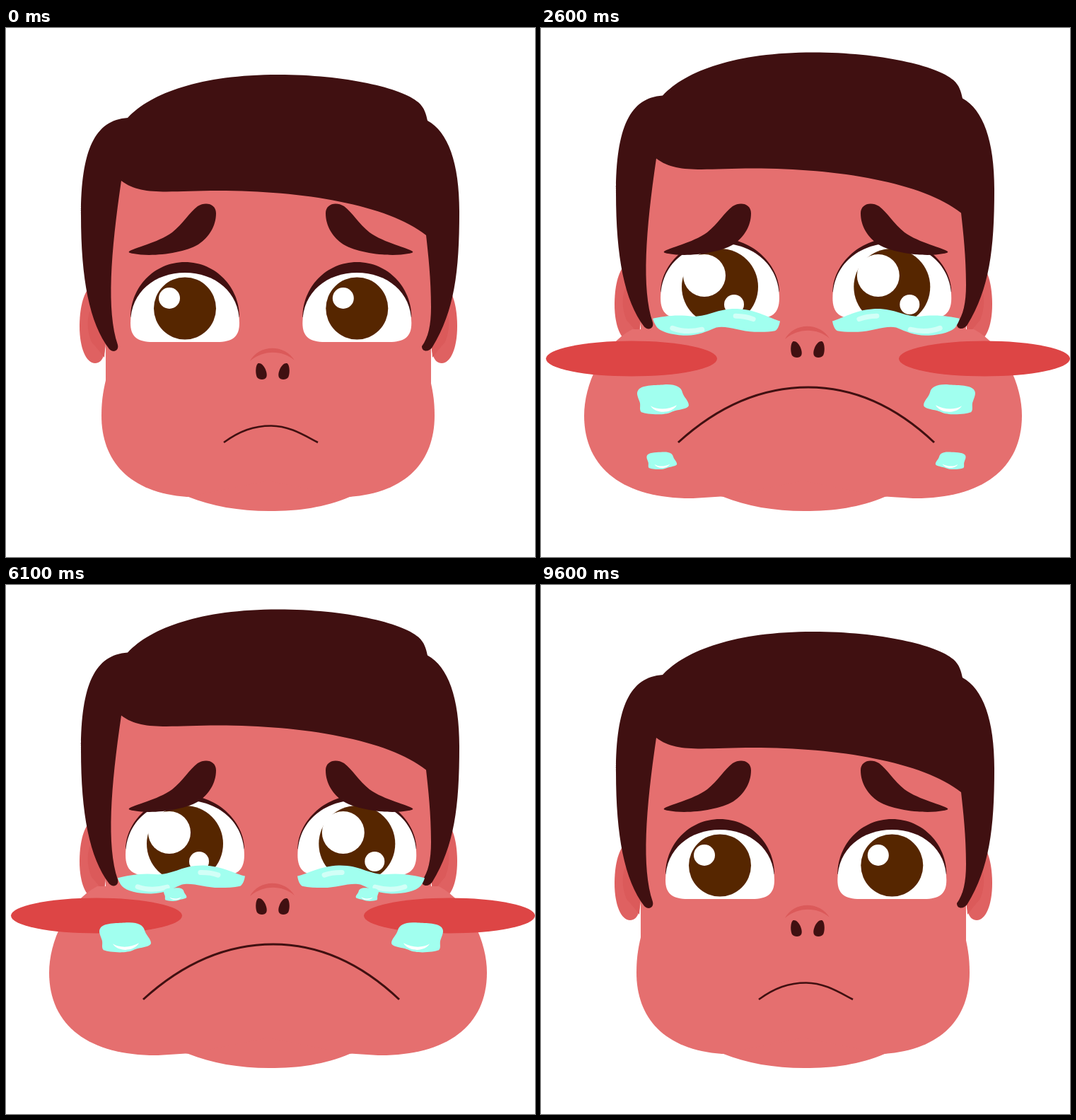
Recreate the animation shown at these times as an HTML page with a canvas. Size 748 by 748 pixels, loop 9630 ms.

```html
<!DOCTYPE html>
<html lang="en">
<head>
<meta charset="utf-8">
<title>Sad face</title>
<style>
html, body { margin: 0; width: 100%; height: 100%; overflow: hidden; background: #fff; }
canvas { display: block; width: 748px; height: 748px; }
</style>
</head>
<body>
<canvas id="stage" width="748" height="748"></canvas>
<script>
const ctx = document.getElementById('stage').getContext('2d');
const LOOP = 9630, CYCLE = 4750, START = 50, HOLD = 3200;
const SKIN = '#e56f6f', SHADE = '#db5a5a', DARK = '#401011', BLUSH = '#dd4545',
      IRIS = '#562600', TEAR = '#a1ffef', SHINE = '#d2fff7';

// rise duration, fall delay, fall duration (ms)
const PARTS = {
  hair: [916, 60, 802],
  ear: [1146, 0, 900],
  nose: [916, 215, 500],
  eye: [970, -30, 930],
  mouth: [1017, 0, 805],
  jaw: [1146, 0, 805],
  blush: [940, -14, 650]
};

// time, x, y, size of each falling drop
const DROPS = [
  [[800, 150, 420, 0], [1120, 157, 466, 1], [1450, 177, 525, 1], [1900, 171, 594, .8], [2200, 152, 629, .33], [2350, 141, 640, 0]],
  [[1150, 240, 422, 0], [1450, 238, 453, .88], [2200, 210, 560, .84], [2600, 165, 619, .55], [2950, 114, 648, 0]],
  [[1850, 165, 422, 0], [2200, 155, 466, 1], [2550, 172, 525, 1], [3000, 146, 598, .7], [3470, 119, 629, .17], [3580, 112, 634, 0]]
];

const shape = {
  head: new Path2D('M141 180H601V500C601 600 560 645 486 663C450 678 415 683 372 683C330 683 290 676 258 663C175 645 141 600 141 500Z'),
  hair: new Path2D('M172 127C205 92 275 66 385 66C480 66 560 85 583 105C592 113 594 122 596 131C625 147 641 190 641 260C641 345 634 400 603 451C599 458 588 459 588 450C597 438 601 420 601 395C601 355 597 320 594 293C540 250 420 230 300 230C230 230 192 238 163 216C148 318 142 400 158 448C160 456 152 460 146 454C118 417 106 355 106 265C106 172 126 130 172 127Z'),
  ear: new Path2D('M120 365C108 375 104 400 104 422C104 452 113 474 126 474C137 474 141 460 141 440V365Z'),
  earFold: new Path2D('M124 395C114 400 113 425 121 444C128 452 133 458 139 466L141 440V400Z'),
  bump: new Path2D('M345 471C358 447 394 447 408 470C390 455 364 455 345 471Z'),
  nostril: new Path2D('M357 474C364 473 371 488 368 494C366 498 358 498 355 494C352 488 353 475 357 474Z'),
  brow: new Path2D('M174 316C180 311 214 304 235 289C250 277 259 261 271 252C283 245 297 249 297 262C297 280 287 296 272 306C250 319 205 324 180 319C174 318 173 317 174 316Z'),
  white: new Path2D('M-77 22C-77 -22 -42 -49 0 -49C42 -49 77 -22 77 22C77 42 67 49 45 49H-45C-67 49 -77 42 -77 22Z'),
  pool: new Path2D('M158 -2C172 -5 190 -9 215 -6C240 -7 250 -19 280 -18C305 -17 325 -5 338 -2C337 4 335 10 331 12C322 14 312 14 302 14C282 14 262 5 248 9C232 16 222 21 205 21C188 21 170 17 164 10C161 6 159 2 158 -2Z'),
  drop: new Path2D('M-34 -14C-28 -21 -8 -20 2 -21C18 -22 26 -18 28 -10C30 -3 37 2 37 8C37 14 20 14 12 18C2 23 -22 21 -30 18C-34 14 -30 8 -33 2C-35 -4 -38 -9 -34 -14Z'),
  dropShine: new Path2D('M-17 9C-8 15 8 15 20 8C14 20 -10 21 -17 9Z'),
  poolShine: new Path2D('M186 11Q205 18 228 12M275 -8Q290 -8 300 -4')
};

const clamp = v => Math.min(1, Math.max(0, v));
const ease = u => (1 - Math.cos(Math.PI * clamp(u))) / 2;
const bell = u => Math.sin(Math.PI * clamp(u));
const mix = (a, b, k) => a + (b - a) * k;

function fill(path, color) {
  ctx.fillStyle = color;
  ctx.fill(path);
}

function oval(x, y, rx, ry, color) {
  ctx.fillStyle = color;
  ctx.beginPath();
  ctx.ellipse(x, y, Math.max(0, rx), Math.max(0, ry), 0, 0, 7);
  ctx.fill();
}

function at(x, y, draw) {
  ctx.save();
  ctx.translate(x, y);
  draw();
  ctx.restore();
}

// draws once as is and once mirrored around x = axis
function both(axis, draw) {
  draw(0);
  ctx.save();
  ctx.translate(2 * axis, 0);
  ctx.scale(-1, 1);
  draw(1);
  ctx.restore();
}

function cheeks(k) {
  const x = mix(143, 129, clamp(2 * k)), y = mix(490, 426, Math.max(0, k) ** .7), e = mix(135, 61, k);
  both(370.5, () => {
    ctx.fillStyle = SKIN;
    ctx.beginPath();
    ctx.moveTo(x, y);
    ctx.bezierCurveTo(mix(138, 85, k), mix(510, 450, k), e, mix(525, 505, k), e, 548);
    ctx.bezierCurveTo(e, mix(612, 625, k), mix(174, 120, k), mix(657, 666, k), mix(256, 215, k), mix(663, 665, k));
    ctx.lineTo(262, 662);
    ctx.lineTo(372, 640);
    ctx.lineTo(372, y);
    ctx.fill();
  });
}

function eye(x, p, right) {
  const k = p.eye, m = p.mouth, s = mix(1, 1.09, k);
  ctx.save();
  ctx.translate(x, mix(395, 358, k));
  ctx.scale(s, s);
  const top = -49 - mix(15, 6.5, k);
  ctx.fillStyle = DARK;
  ctx.beginPath();
  ctx.moveTo(-77, 14);
  ctx.bezierCurveTo(-77, top + 36, -44, top, 0, top);
  ctx.bezierCurveTo(44, top, 77, top + 36, 77, 14);
  ctx.fill();
  fill(shape.white, '#fff');
  ctx.clip(shape.white);
  const r = mix(44, 54, m) / s;
  oval(0, (mix(396.5, 366, m) - mix(395, 358, k)) / s, r, r, IRIS);
  ctx.restore();
  const shift = right ? 2.5 : 0, big = mix(15, 30, p.jaw);
  oval(x - 22 + shift, mix(382, 350, m), big, big, '#fff');
  oval(x + 20 + 2 * shift, 423 - 32 * m, 14 * m, 14 * m, '#fff');
}

function mouth(k) {
  const lean = bell(k);
  const px = mix(375, 378, k) + 9 * lean, py = mix(562.5, 508, k);
  const l = mix(308, 194, k), r = mix(441, 556, k);
  ctx.strokeStyle = DARK;
  ctx.lineWidth = mix(2.6, 3, k);
  ctx.beginPath();
  ctx.moveTo(l, 586);
  ctx.bezierCurveTo(mix(330, 250, k), mix(570, 535, k) + 5 * lean, mix(350, 312, k) + 18 * lean, py + 2 * lean, px, py);
  ctx.bezierCurveTo(mix(400, 444, k), py, mix(420, 502, k), mix(575, 535, k), r, 586);
  ctx.stroke();
}

function pools(p, time) {
  const open = Math.min(1, p.mouth * 1.9);
  if (open < .02) return;
  both(375, () => at(248, 440 - 24 * p.eye + 1.5 * Math.sin(time / 240), () => {
    ctx.scale(.89 + .11 * p.eye, open);
    ctx.rotate(.02 * Math.sin(time / 330));
    ctx.translate(-248, 0);
    fill(shape.pool, TEAR);
    ctx.strokeStyle = SHINE;
    ctx.lineWidth = 7;
    ctx.lineCap = 'round';
    ctx.stroke(shape.poolShine);
    ctx.lineCap = 'butt';
  }));
}

function drop(keys, time) {
  const i = keys.findIndex(key => key[0] > time);
  if (i < 1) return;
  const a = keys[i - 1], b = keys[i], u = (time - a[0]) / (b[0] - a[0]);
  const [x, y, s] = [1, 2, 3].map(n => mix(a[n], b[n], u));
  both(375, () => at(x, y, () => {
    ctx.scale(s, s);
    fill(shape.drop, TEAR);
    fill(shape.dropShine, '#fff');
  }));
}

function render(t) {
  const time = (t < CYCLE ? t : t - CYCLE) - START;
  const p = {};
  for (const name in PARTS) {
    const [rise, delay, fall] = PARTS[name];
    p[name] = ease(time / rise) - ease((time - HOLD - delay) / fall);
  }
  const up = 5 * bell(time / 950), down = 3 * bell((time - HOLD) / 780);

  ctx.fillStyle = '#fff';
  ctx.fillRect(0, 0, 748, 748);

  at(0, -31 * p.ear, () => both(371, () => {
    fill(shape.ear, '#df6161');
    fill(shape.earFold, SHADE);
  }));
  fill(shape.head, SKIN);
  cheeks(p.jaw);
  at(0, -31.5 * p.hair, () => fill(shape.hair, DARK));

  const by = 500 - 32.4 * p.mouth;
  for (const x of [128, 627]) oval(x, by, 121 * p.blush, 25 * p.blush, BLUSH);

  at(0, -31 * p.nose, () => {
    fill(shape.bump, SHADE);
    both(377, () => fill(shape.nostril, DARK));
  });
  mouth(p.mouth);
  eye(253, p, false);
  eye(496.3, p, true);
  both(374.5, right => at(0, -up - (right ? down : 0), () => fill(shape.brow, DARK)));
  pools(p, time);
  for (const keys of DROPS) drop(keys, time);
}

const begin = performance.now();
function tick() {
  render((performance.now() - begin) % LOOP);
  requestAnimationFrame(tick);
}
tick();
</script>
</body>
</html>
```
